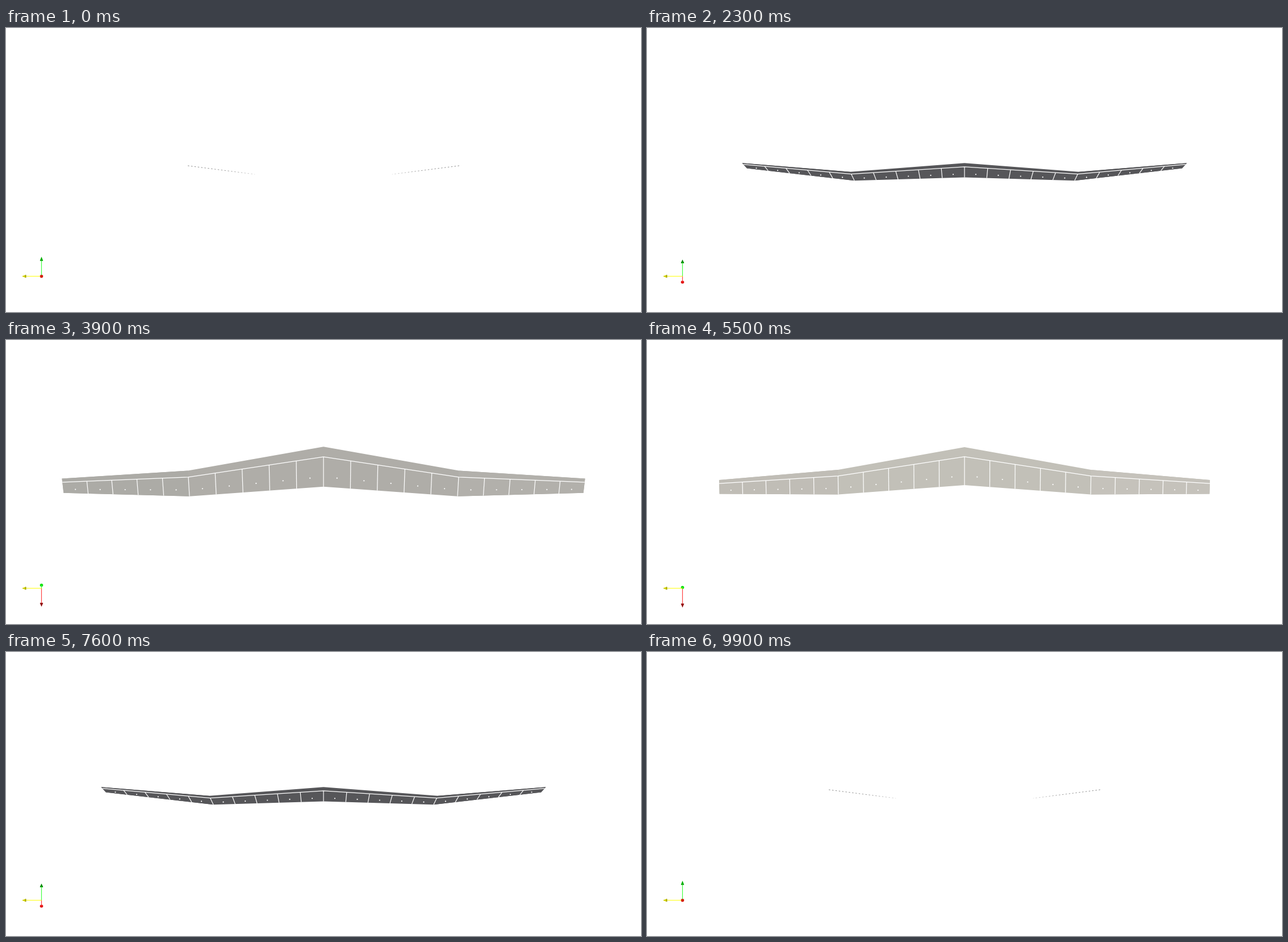
Recreate the animation shown at these times as an HTML page with a canvas. Size 1118 px wide and 501 px high, loop 10000 ms.

```html
<!DOCTYPE html>
<html lang="en">
<head>
<meta charset="utf-8">
<title>Wing orbit</title>
<style>
  html, body { margin: 0; width: 100%; height: 100%; overflow: hidden; background: #fff; }
  canvas { display: block; }
</style>
</head>
<body>
<canvas id="stage" width="1118" height="501"></canvas>
<script>
const ctx = document.getElementById('stage').getContext('2d');
const W = 1118, H = 501, STEP = 100, FRAMES = 100;
const FOCAL = H / 2 / Math.tan(Math.PI / 12); // 30 degree view angle
const FRONT = 3.92, BELOW = 2.204;            // camera distances, in half spans
const STRIPS = 5;

// Wing sections: span s, height u, leading and trailing edge
const ROOT = { s: 0, u: -0.0315, le: -0.1399, te: 0.0104 };
const KINK = { s: 0.5, u: -0.0315, le: -0.0503, te: 0.0476 };
const TIP = { s: 1, u: 0.0315, le: -0.0061, te: 0.0507 };

const mix = (a, b, t) => a + (b - a) * t;

// The camera slides on a straight line from in front of the wing to below it.
function cameraAt(frame) {
  const x = 1 - Math.abs(frame - 49.5) / 49.5;
  const t = x * x * (3 - 2 * x);
  const c = FRONT * (1 - t), u = BELOW * t, dist = Math.hypot(c, u);
  return { dist, sin: u / dist, cos: c / dist };
}

function project(cam, s, u, c) {
  const k = FOCAL / (cam.dist + c * cam.cos + u * cam.sin);
  return [W / 2 + s * k, H / 2 - (u * cam.cos - c * cam.sin) * k];
}

function section(a, b, t) {
  return { s: mix(a.s, b.s, t), u: mix(a.u, b.u, t), le: mix(a.le, b.le, t), te: mix(a.te, b.te, t) };
}

// Point of a section at a chord fraction; side is -1 or 1
const at = (cam, sec, chord, side) =>
  project(cam, sec.s * side, sec.u, mix(sec.le, sec.te, chord));

function trace(points) {
  ctx.beginPath();
  points.forEach(p => ctx.lineTo(p[0], p[1]));
}

function fillPoly(points, color) {
  trace(points);
  ctx.closePath();
  ctx.fillStyle = color;
  ctx.fill();
}

function line(points, color, width) {
  trace(points);
  ctx.strokeStyle = color;
  ctx.lineWidth = width;
  ctx.stroke();
}

// Headlight, warm key light from above, cool fill light from beneath
function shade(cam, tilt) {
  const head = cam.sin;
  const key = Math.max(0, 0.633 * cam.sin - 0.766 * cam.cos + 0.11 * tilt);
  const fill = 0.259 * cam.sin + 0.966 * cam.cos;
  const warm = [1, 0.972, 0.9], cool = [0.94, 0.955, 1];
  const rgb = warm.map((w, i) => Math.round(255 * (0.25 * head + 0.75 * w * key + 0.25 * cool[i] * fill)));
  return `rgb(${rgb})`;
}

function drawWing(cam) {
  const outline = (chord, sides) => sides.map(([sec, side]) => at(cam, sec, chord, side));
  const span = [[TIP, -1], [KINK, -1], [ROOT, 1], [KINK, 1], [TIP, 1]];
  fillPoly([...outline(0, span), ...outline(1, span).reverse()], shade(cam, 0));
  for (const side of [-1, 1]) {
    const outer = [[KINK, side], [TIP, side]];
    fillPoly([...outline(0, outer), ...outline(1, outer).reverse()], shade(cam, 0.125 * side));
  }
  line(outline(0.25, span), '#fff', 1.2);

  for (const side of [-1, 1]) {
    for (const [a, b] of [[ROOT, KINK], [KINK, TIP]]) {
      for (let i = 0; i < STRIPS; i++) {
        const edge = section(a, b, i / STRIPS);
        const mid = section(a, b, (i + 0.5) / STRIPS);
        if (edge.s || side > 0) line([at(cam, edge, 0.25, side), at(cam, edge, 1, side)], '#fff', 1.2);
        const [x, y] = at(cam, mid, 0.75, side);
        ctx.beginPath();
        ctx.arc(x, y, 1.1, 0, 7);
        ctx.fillStyle = '#fff';
        ctx.fill();
      }
    }
  }
}

// Seen edge-on, only specks of the outer panels remain.
function drawSpecks(cam) {
  ctx.setLineDash([2.5, 3.4]);
  for (const side of [-1, 1]) {
    const tip = at(cam, TIP, 0, side), kink = at(cam, KINK, 0, side);
    const g = ctx.createLinearGradient(tip[0], 0, kink[0], 0);
    g.addColorStop(0, '#8a8a8a');
    g.addColorStop(0.6, '#a0a0a0');
    g.addColorStop(1, '#dcdcdc');
    line([tip, kink], g, 1);
  }
  ctx.setLineDash([]);
}

// One arrow of the axis marker; (dx, dy) is its screen direction, away its depth.
function drawAxis(dx, dy, away, colors) {
  const X = 62.5, Y = 438, R = 2.8;
  const point = r => {
    const k = r / (1 + 0.15 * away * r / 34);
    return [X + dx * k, Y + dy * k];
  };
  const base = point(27.5), tip = point(34.5);
  const len = Math.hypot(dx, dy) || 1, nx = -dy / len * R, ny = dx / len * R;
  fillPoly([[base[0] + nx, base[1] + ny], tip, [base[0] - nx, base[1] - ny]], colors.cone);
  ctx.beginPath();
  ctx.ellipse(base[0], base[1], Math.max(0.6, R * away), R, Math.atan2(dy, dx), 0, 7);
  ctx.fillStyle = colors.base;
  ctx.fill();
  line([[X, Y], base], colors.shaft, 1.2);
}

function drawMarker(cam) {
  drawAxis(0, cam.sin, cam.cos, { cone: '#900000', base: cam.sin > 0.9 ? '#800000' : '#e01010', shaft: '#ff4040' });
  drawAxis(0, -cam.cos, cam.sin, { cone: cam.sin < 0.2 ? '#00b000' : '#008a00', base: cam.cos > 0.8 ? '#009000' : '#10e010', shaft: '#40ff40' });
  drawAxis(-1, 0, 0, { cone: '#d0d000', base: '#606000', shaft: '#ffff20' });
  if (cam.cos > 0.97) {
    ctx.beginPath();
    ctx.arc(62.5, 438 + cam.sin * 24, 2.3, 0, 7);
    ctx.fillStyle = '#d02010';
    ctx.fill();
  }
}

function draw(now) {
  const frame = Math.floor(now / STEP) % FRAMES;
  const cam = cameraAt(Math.min(frame, FRAMES - 1 - frame));
  ctx.fillStyle = '#fff';
  ctx.fillRect(0, 0, W, H);
  if (cam.sin > 0.004) drawWing(cam);
  if (cam.sin < 0.012) drawSpecks(cam);
  drawMarker(cam);
}

const start = performance.now();
function tick() {
  draw(performance.now() - start);
  requestAnimationFrame(tick);
}
tick();
</script>
</body>
</html>
```
